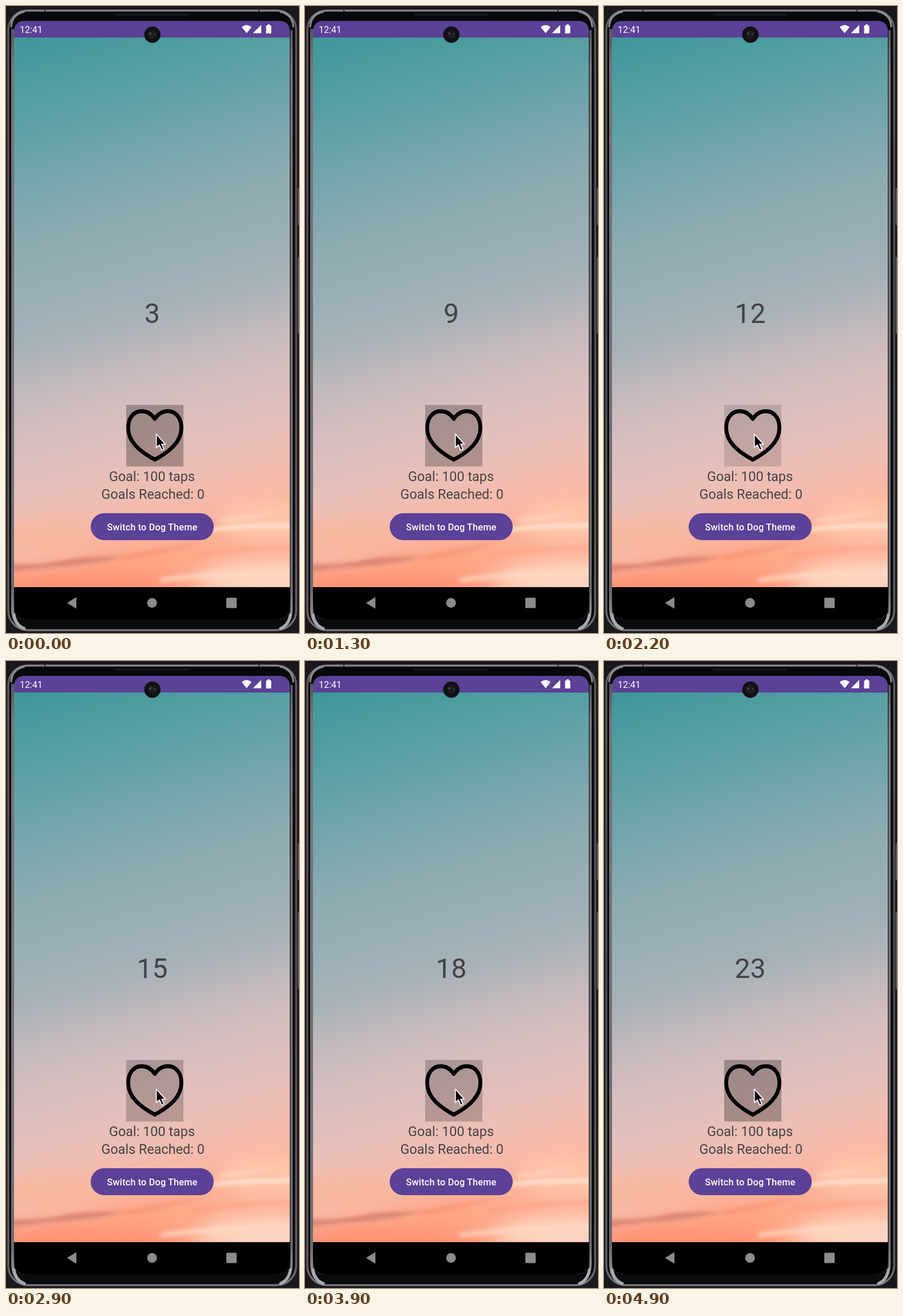
An HTML page for the animation above (5000 ms loop, 512x1094 px).

```html
<!DOCTYPE html>
<html lang="en">
<head>
<meta charset="utf-8">
<title>Tap counter</title>
<style>
  html, body { margin: 0; width: 100%; height: 100%; overflow: hidden; background: #19171b; }
  svg { display: block; width: 100vw; height: 100vh; }
  text { font-family: Roboto, sans-serif; }
  .label { font-size: 23.4px; fill: #454347; text-anchor: middle; }
</style>
</head>
<body>
<svg viewBox="0 0 512 1094">
  <defs>
    <linearGradient id="sky" gradientUnits="userSpaceOnUse" x1="14" y1="55" x2="288" y2="1070"></linearGradient>
    <linearGradient id="rim" x1="0" y1="0" x2="0" y2="1">
      <stop offset="0" stop-color="#858388"/>
      <stop offset=".025" stop-color="#5b595e"/>
      <stop offset=".5" stop-color="#4e4c51"/>
      <stop offset=".97" stop-color="#626065"/>
      <stop offset="1" stop-color="#77757a"/>
    </linearGradient>
    <linearGradient id="edge" x1="0" y1="0" x2="0" y2="1">
      <stop offset="0" stop-color="#57555a"/>
      <stop offset=".06" stop-color="#77757a"/>
      <stop offset=".94" stop-color="#6d6b70"/>
      <stop offset="1" stop-color="#a3a2a6"/>
    </linearGradient>
    <filter id="soft" x="-30%" y="-80%" width="160%" height="260%"><feGaussianBlur stdDeviation="3"/></filter>
    <filter id="haze" x="-50%" y="-100%" width="200%" height="300%"><feGaussianBlur stdDeviation="16"/></filter>
    <clipPath id="screen"><path d="M14 46Q14 26 34 26H476Q496 26 496 46V1046Q496 1070 474 1070H36Q14 1070 14 1046Z"/></clipPath>
  </defs>

  <!-- phone body -->
  <rect width="512" height="1094" fill="#1a181c"/>
  <rect x="4" y="8" width="503" height="1081" rx="34" fill="#0b0a0c" stroke="url(#rim)" stroke-width="3.5"/>
  <path d="M68 4V10M442 4V10" stroke="#2b292e" stroke-width="2"/>
  <path d="M11.5 40V1052Q12 1080 34 1087" fill="none" stroke="url(#edge)" stroke-width="5"/>
  <path d="M499 42V1052Q498 1080 478 1087" fill="none" stroke="url(#edge)" stroke-width="4"/>
  <path d="M9 36Q11 14 31 11M502 36Q500 14 480 11" fill="none" stroke="#8f8d92" stroke-width="3" stroke-linecap="round"/>
  <path d="M14 1062Q17 1080 31 1086M497 1062Q494 1080 480 1086" fill="none" stroke="#aaa8ad" stroke-width="5" stroke-linecap="round"/>
  <rect x="24" y="12" width="464" height="14" rx="7" fill="#080709"/>
  <rect x="190" y="13" width="130" height="4" rx="2" fill="#17161a"/>
  <path d="M511 318V382M511 438V572" stroke="#57555a" stroke-width="2.5"/>

  <g clip-path="url(#screen)">
    <rect x="14" y="26" width="482" height="1044" fill="url(#sky)"/>
    <g filter="url(#haze)">
      <ellipse cx="470" cy="900" rx="95" ry="42" fill="#ffc8ae" opacity=".8"/>
      <ellipse cx="470" cy="1000" rx="135" ry="32" fill="#ffd9c5" opacity=".95"/>
      <ellipse cx="130" cy="1012" rx="190" ry="28" fill="#ff8e70" opacity=".9"/>
      <ellipse cx="60" cy="925" rx="110" ry="24" fill="#fbb596" opacity=".7"/>
      <ellipse cx="260" cy="965" rx="120" ry="18" fill="#ff9e7d" opacity=".6"/>
    </g>
    <g filter="url(#soft)">
      <path d="M10 974Q60 976 100 967T205 962Q150 975 100 978T10 988Z" fill="#d27d6c" opacity=".75"/>
      <path d="M190 962Q250 948 340 937Q280 956 215 967Z" fill="#f78f73" opacity=".6"/>
      <path d="M350 912Q410 902 500 903V911Q420 909 350 918Z" fill="#ffe0cc"/>
      <path d="M372 894Q420 890 475 881Q440 896 372 901Z" fill="#ffd4bd" opacity=".8"/>
      <path d="M270 997Q360 985 500 982V992Q380 994 270 1006Z" fill="#ffd9c4" opacity=".7"/>
      <path d="M320 956Q390 943 500 941V946Q400 952 320 963Z" fill="#ff9f80" opacity=".6"/>
    </g>
    <rect x="14" y="26" width="482" height="29" fill="#5b4197"/>
    <rect x="14" y="1014" width="482" height="56"/>
  </g>

  <!-- status bar -->
  <text x="24" y="46.5" font-size="16" fill="#fff">12:41</text>
  <g fill="#fff">
    <path d="M412 37Q420.500 29.500 429 37L420.500 47.500Z"/>
    <path d="M446 33V47.500H431.500Z"/>
    <path d="M457 32H461V34H462.500Q463.500 34 463.500 35V47Q463.500 48 462.500 48H455.500Q454.500 48 454.500 47V35Q454.500 34 455.500 34H457Z"/>
  </g>
  <circle cx="255.800" cy="50" r="14.300" fill="#111013"/>
  <circle cx="255.800" cy="50" r="7.500" fill="#1d1c20"/>
  <circle cx="252" cy="48" r="2" fill="#47454b"/>
  <circle cx="260" cy="49" r="1.500" fill="#3b393f"/>

  <text id="count" x="255.500" y="553" font-size="48" fill="#434246" text-anchor="middle"></text>

  <rect id="press" x="210" y="696" width="100" height="107.500"/>
  <path d="M260 720.500C254 711 246 707 237 707C223 707 213.500 719 213.500 736C213.500 760 233 777 260 791.500C287 777 306.500 760 306.500 736C306.500 719 297 707 283 707C274 707 266 711 260 720.500Z"
        fill="none" stroke="#000" stroke-width="6.800" stroke-linejoin="round"/>

  <text class="label" x="255" y="828.500">Goal: 100 taps</text>
  <text class="label" x="256.700" y="860">Goals Reached: 0</text>

  <rect x="148" y="885" width="215" height="47" rx="23.500" fill="#5b4197"/>
  <text x="255.500" y="915" font-size="16.300" font-weight="500" letter-spacing=".15" fill="#fff" text-anchor="middle">Switch to Dog Theme</text>

  <!-- navigation -->
  <g fill="#8c8b8d">
    <path d="M106.500 1041.500L123 1031.500V1051.500Z"/>
    <circle cx="255.200" cy="1041.500" r="8.500"/>
    <rect x="385" y="1032.500" width="18" height="18" rx="1.500"/>
  </g>

  <path d="M262.700 747V770.500L268 765.800L272 775L276 773.200L272 764.500H278.500Z" stroke="#fff" stroke-width="1.700" stroke-linejoin="round"/>
</svg>

<script>
const LOOP = 5000, STEP = 100;
const FIRST = 3;
const taps = [-50, 200, 450, 650, 850, 1050, 1200, 1450, 1700, 1950, 2250,
              2500, 2750, 3050, 3400, 3750, 4000, 4200, 4400, 4650, 4850];
const count = document.getElementById('count');
const press = document.getElementById('press');

// Distance along the slanted sky axis, then colour
const sky = [
  [55, '#3e979a'], [185, '#569fa3'], [300, '#71a5ab'], [420, '#8cabb1'],
  [520, '#99aeb5'], [600, '#a6b2b8'], [640, '#b4b5ba'], [700, '#c8babd'],
  [760, '#d5bebe'], [830, '#e1bfbc'], [900, '#eebeb4'], [960, '#f8b9a8'],
  [1020, '#fcb094'], [1144, '#ffac91']
];
document.getElementById('sky').innerHTML = sky.map(([d, color]) =>
  `<stop offset="${(d - 55) / 1089}" stop-color="${color}"/>`).join('');

function draw(time) {
  const t = Math.floor((time % LOOP) / STEP) * STEP;
  const last = taps.findLastIndex(tap => tap <= t);
  const age = t - taps[last];
  count.textContent = FIRST + last;
  press.setAttribute('opacity', Math.max(0.12, 0.31 - age * 0.0007));
}

const start = performance.now();
function tick() {
  draw(performance.now() - start);
  requestAnimationFrame(tick);
}
tick();
</script>
</body>
</html>
```
